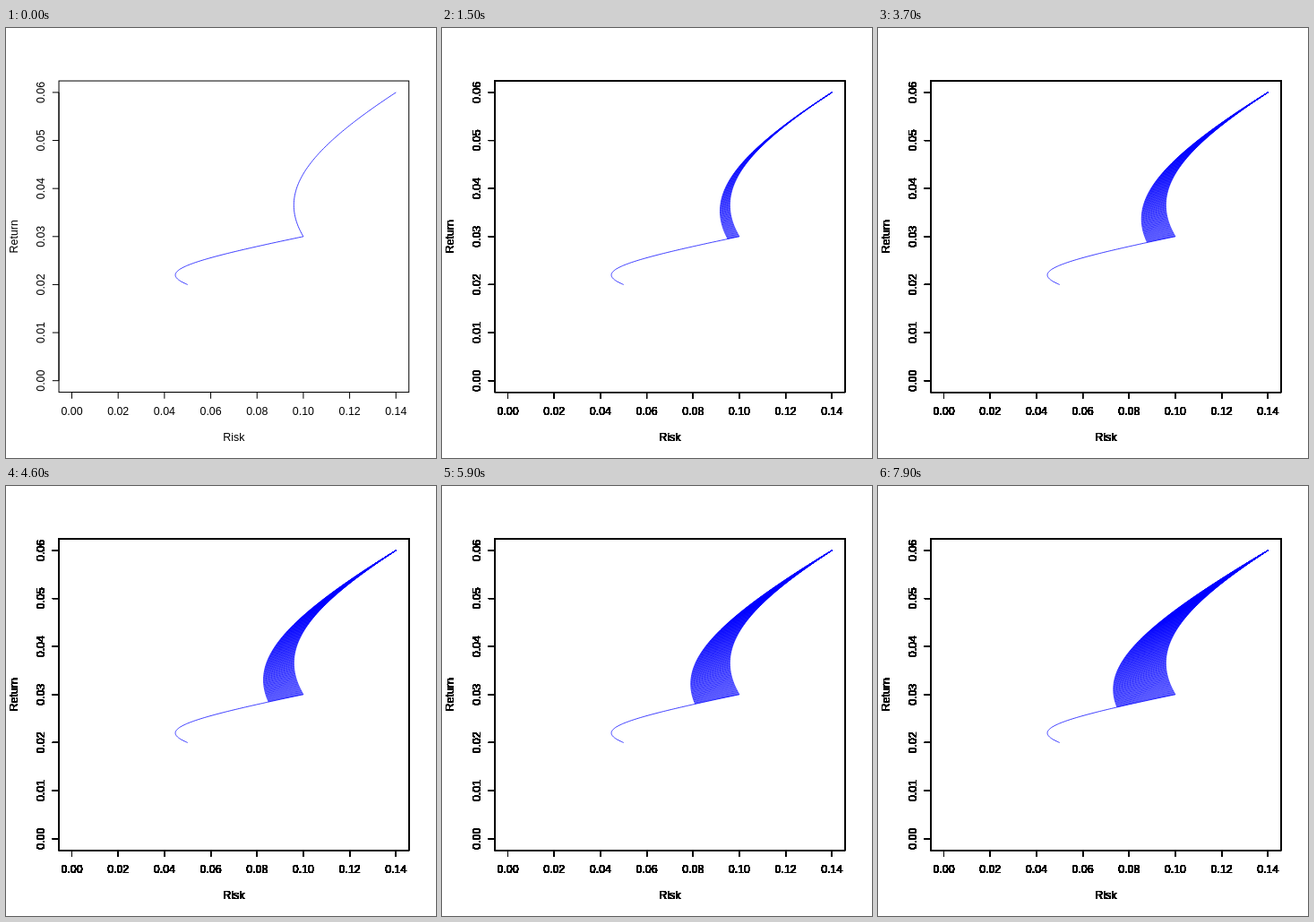
An HTML page with a canvas for the animation above (8 s loop, 480 px wide and 480 px high).

```html
<!DOCTYPE html>
<html>
<head>
<meta charset="utf-8">
<style>
  html, body { margin: 0; width: 100%; height: 100%; overflow: hidden; background: #fff; }
  canvas { display: block; }
</style>
</head>
<body>
<canvas id="stage" width="480" height="480"></canvas>
<script>
const ctx = document.getElementById('stage').getContext('2d');
const LEFT = 59.04, RIGHT = 449.76, TOP = 59.04, BOTTOM = 406.56, TICK = 7.2;
const px = risk => 73.51 + risk * 2584.1;
const py = ret => 393.69 - ret * 5363;

// Three assets: variances, returns and pairwise covariances
const A = { v: 0.0025, r: 0.02 }, B = { v: 0.01, r: 0.03 }, C = { v: 0.0196, r: 0.06 };
const AB = 0, BC = 0.0063, AC = -0.0042;

const mix = (p, q, cov, w) => ({
  v: (1 - w) ** 2 * p.v + w * w * q.v + 2 * w * (1 - w) * cov,
  r: (1 - w) * p.r + w * q.r
});

function frontier(p, q, cov) {
  ctx.strokeStyle = '#00f';
  ctx.lineWidth = 0.75;
  ctx.beginPath();
  for (let i = 0; i <= 100; i++) {
    const m = mix(p, q, cov, i / 100);
    ctx.lineTo(px(Math.sqrt(m.v)), py(m.r));
  }
  ctx.stroke();
}

function line(x1, y1, x2, y2) {
  ctx.beginPath();
  ctx.moveTo(x1, y1);
  ctx.lineTo(x2, y2);
  ctx.stroke();
}

function label(text, x, y, angle = 0) {
  ctx.save();
  ctx.translate(x, y);
  ctx.rotate(angle);
  ctx.fillText(text, 0, 0);
  ctx.restore();
}

function axes() {
  const up = -Math.PI / 2;
  ctx.strokeStyle = ctx.fillStyle = '#000';
  ctx.lineWidth = 1;
  ctx.font = '12.4px "Liberation Sans", Arial, sans-serif';
  ctx.textAlign = 'center';
  ctx.strokeRect(LEFT, TOP, RIGHT - LEFT, BOTTOM - TOP);
  line(px(0), BOTTOM, px(0.14), BOTTOM);
  line(LEFT, py(0), LEFT, py(0.06));
  for (let i = 0; i <= 7; i++) {
    const risk = i * 0.02, x = px(risk);
    line(x, BOTTOM, x, BOTTOM + TICK);
    label(risk.toFixed(2), x, 432);
  }
  for (let i = 0; i <= 6; i++) {
    const ret = i * 0.01, y = py(ret);
    line(LEFT, y, LEFT - TICK, y);
    label(ret.toFixed(2), 43, y, up);
  }
  label('Risk', 254.4, 461);
  label('Return', 13, 232.8, up);
}

// Each step overprints the plot, so antialiased edges darken as steps add up
function addStep(k) {
  if (k === 0) {
    ctx.clearRect(0, 0, 480, 480);
    frontier(A, B, AB);
  }
  const w = 1 - k / 300;
  axes();
  frontier(mix(A, B, AB, w), C, w * BC + (1 - w) * AC);
}

let drawn = -1;
function render(now) {
  const step = Math.floor(now % 8000 / 100);
  if (step < drawn) drawn = -1;
  while (drawn < step) addStep(++drawn);
  requestAnimationFrame(render);
}
const start = performance.now();
const tick = render;
tick(Math.max(0, performance.now() - start));
</script>
</body>
</html>
```
